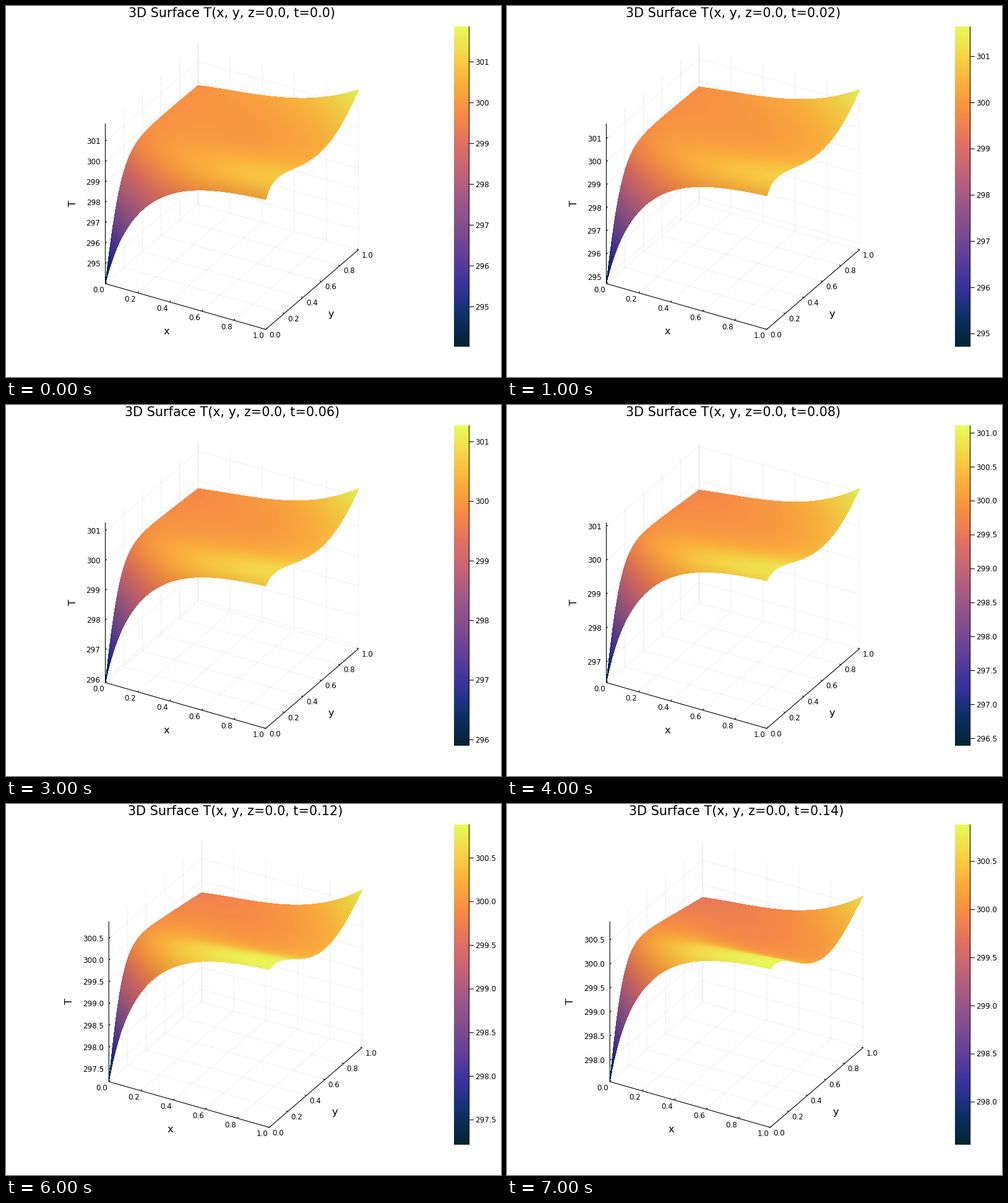
A matplotlib script for the animation above (8000 ms loop, 800 by 600 pixels).

```python
import numpy as np
import matplotlib.pyplot as plt
from matplotlib.animation import FuncAnimation
from matplotlib.collections import LineCollection, PolyCollection
from matplotlib.colors import LinearSegmentedColormap

FRAMES, DT = 8, 0.02
UX, UY, HEIGHT = np.array([259.3, 74]), np.array([150, -129]), 259
BAR_L, BAR_R, BAR_TOP, BAR_BOTTOM = 724, 748, 33, 551
SMALL, MEDIUM, LARGE = 11.9, 16.4, 20.75
PX = 0.72  # points per pixel at 100 dpi

THERMAL = LinearSegmentedColormap.from_list("thermal", [
    "#032333", "#0d3064", "#35329b", "#5d3e99", "#7e4d8f", "#9e5987",
    "#c16479", "#e17161", "#f68b45", "#fbad3c", "#f6d346", "#e7fa5a"], N=256)

N = 130
X, Y = np.meshgrid(np.linspace(0, 1, N), np.linspace(1, 0, N))


def coldest(t):
    return 294.02 + t * (36.95 - 101 * t + 125 * t**2)


def far_corner(t):
    return 301.87 - t * (11.55 - 30 * t + 50 * t**2)


def limits(t):
    return coldest(t), max(far_corner(t), 300.885)


def temperature(t):
    front = 300.506 + t * (5.37 - 17.9 * t)
    layer = 1 - np.tanh((5.5 + 6 * t) * Y)

    # Edge x = 0, without the cold corner
    left = 299.915 + t * (0.9 + 10.8 * t) - (0.09 + 3.1 * t) * Y
    left = left + (front - left) * layer

    # Edge x = 1: hump, valley and rise through five key points
    keys = [301.08 - t, 300.8 - 1.8 * t, 300.42 + t * (0.6 - 18 * t),
            300.84 - 3.7 * t, far_corner(t)]
    right = np.polyval(np.polyfit([0, 0.27, 0.55, 0.8, 1], keys, 4), Y)
    right = right - (keys[0] - front) * np.exp(-22 * Y)

    sag = (0.93 - 2.8 * t) * (1 + 2.1 * X) * X * (1 - X) * Y**2
    ridge = (4.6 - 7 * t) * (1 - X) * (1 - np.exp(-6 * X)) * Y * np.exp(-Y / 0.17)

    # Cold corner, fading along both edges
    fast = 0.13 + 0.5 * t
    fade = (1 - fast) * np.exp(-3.85 * X) + fast * np.exp(-14 * X)
    cold = (front - coldest(t)) * fade * layer
    return (1 - X) * left + X * right - sag + ridge - cold


def corners(a):
    return np.stack([a[:-1, :-1], a[:-1, 1:], a[1:, 1:], a[1:, :-1]], axis=2)


def face_colors(z):
    """Colour by height, dimmed on steep slopes."""
    slope_y, slope_x = np.gradient(z, 1 / (N - 1))
    light = 0.85 + 0.15 / np.sqrt(1 + slope_x**2 + slope_y**2)
    rgba = THERMAL(np.clip(corners(z).mean(axis=2), 0, 1))
    rgba[..., :3] *= corners(light).mean(axis=2)[..., None]
    return rgba.reshape(-1, 4)


fig = plt.figure(figsize=(8, 6), dpi=100, facecolor="white")
ax = fig.add_axes([0, 0, 1, 1])


def label(x, y, text, size=SMALL, ha="center", **kw):
    ax.text(x, y, text, fontsize=size * PX, family="DejaVu Sans", ha=ha,
            va="baseline", **kw)


def tick_label(x, y, text, ha="center"):
    label(x, y + 0.365 * SMALL, text, ha=ha)


def lines(segments, width, color, zorder):
    ax.add_collection(LineCollection(segments, linewidths=width * PX, colors=[color],
                                     zorder=zorder, snap=False))


def ticks(lo, hi, step):
    return np.arange(np.ceil(lo / step) * step, hi, step)


def number(v, step):
    return f"{v:.1f}" if step < 1 else f"{v:.0f}"


def draw(i):
    t = round(i * DT, 2)
    lo, hi = limits(t)
    z_step = 0.5 if i >= 6 else 1
    bar_step = 0.5 if i >= 4 else 1
    shift = 5.7 if z_step < 1 else 0  # longer tick labels move the plot
    origin = np.array([160.5 + shift, 449])

    def at(x, y, z=0):
        return origin + x * UX + y * UY - np.array([0, z * HEIGHT])

    ax.clear()
    ax.axis("off")

    # Grid
    z_ticks = [(v, (v - lo) / (hi - lo)) for v in ticks(lo, hi, z_step)]
    unit = np.linspace(0, 1, 6)
    grid = []
    for u in unit:
        grid += [[at(u, 0), at(u, 1), at(u, 1, 1)], [at(1, u), at(0, u), at(0, u, 1)]]
    grid += [[at(0, 0, z), at(0, 1, z), at(1, 1, z)] for _, z in z_ticks]
    lines(grid, 0.75, (0, 0, 0, 0.085), 1)

    # Surface, drawn from back to front
    z = (temperature(t) - lo) / (hi - lo)
    pts = np.stack([origin[0] + X * UX[0] + Y * UY[0],
                    origin[1] + X * UX[1] + Y * UY[1] - z * HEIGHT], axis=-1)
    ax.add_collection(PolyCollection(
        corners(pts).reshape(-1, 4, 2), facecolors=face_colors(z), zorder=2,
        edgecolors="none", linewidths=0, antialiaseds=False))

    # Axes and their ticks
    dx, dy = UX / np.hypot(*UX) * 3, UY / np.hypot(*UY) * 3
    strokes = [[at(0, 0, 1), at(0, 0), at(1, 0), at(1, 1)]]
    for u in unit:
        px, py = at(u, 0), at(1, u)
        strokes += [[px, px + dy], [py, py - dx]]
        tick_label(px[0] - 11.3, px[1] + 10, f"{u:.1f}")
        tick_label(py[0] + 14.4, py[1] + 8.3, f"{u:.1f}")
    for v, zn in z_ticks:
        p = at(0, 0, zn)
        strokes.append([p, p + dy])
        tick_label(p[0] - 8, p[1], number(v, z_step), "right")

    # Colour bar
    ax.imshow(np.linspace(1, 0, 518)[:, None], cmap=THERMAL, aspect="auto",
              extent=(BAR_L, BAR_R, BAR_BOTTOM, BAR_TOP), interpolation="nearest")
    edge = BAR_R + 0.5
    strokes.append([(edge, BAR_TOP), (edge, BAR_BOTTOM)])
    for v in ticks(lo, hi, bar_step):
        y = BAR_BOTTOM - (v - lo) / (hi - lo) * (BAR_BOTTOM - BAR_TOP)
        strokes.append([(edge, y), (edge + 7.5, y)])
        tick_label(758.3, y, number(v, bar_step), "left")
    lines(strokes, 1.1, "black", 3)

    # Titles
    label(365.3 + shift, 18.3, f"3D Surface T(x, y, z=0.0, t={t})", LARGE)
    label(259.5 + shift, 530.8, "x", MEDIUM)
    label(525.3 + shift, 503, "y", MEDIUM)
    label(112.6 - shift, 319.3, "T", MEDIUM, rotation=90, rotation_mode="anchor")
    ax.set_xlim(0, 800)
    ax.set_ylim(600, 0)
    return []


anim = FuncAnimation(fig, draw, frames=FRAMES, interval=1000, repeat=True)
plt.show()
```
